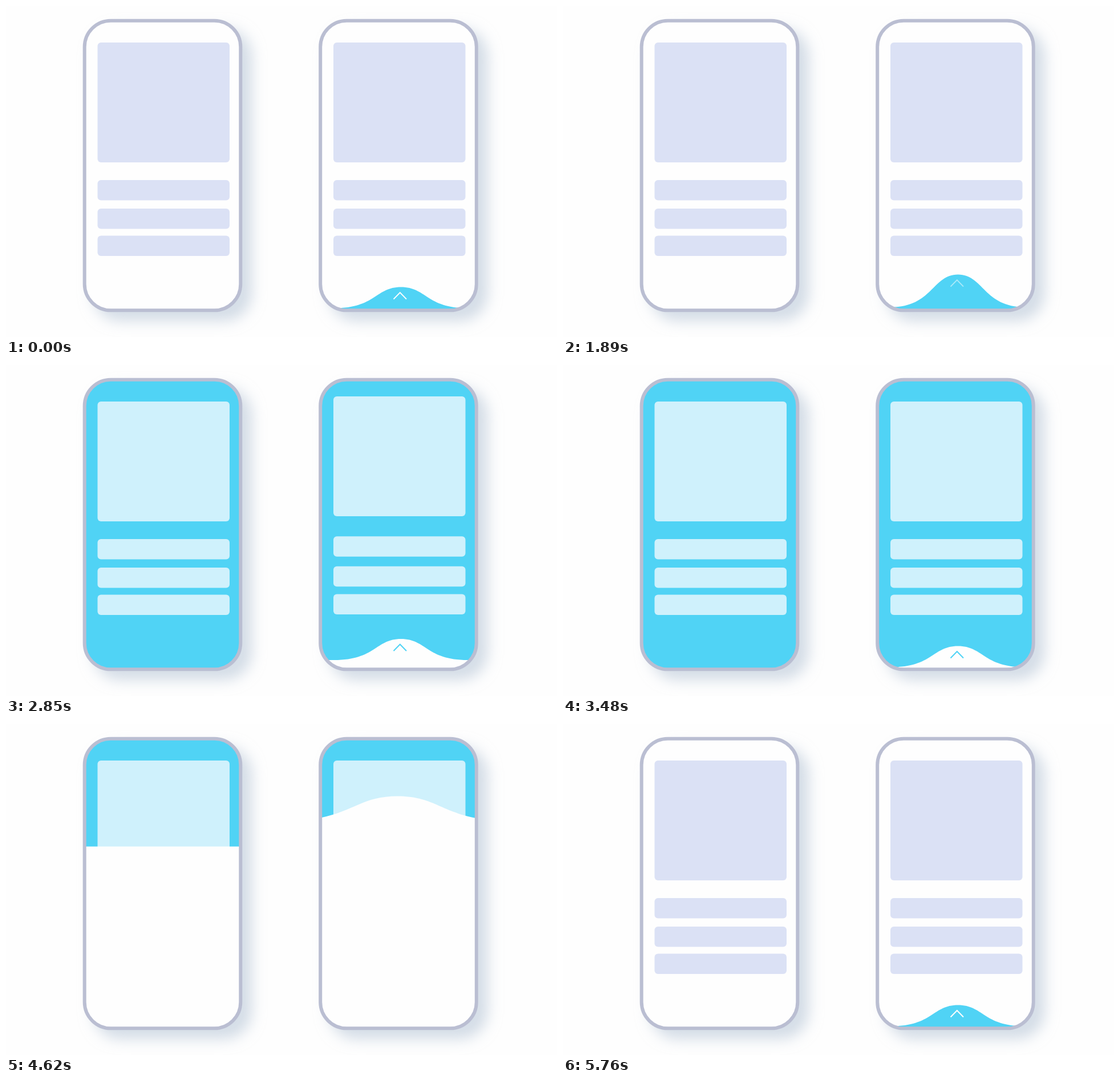
An HTML page with a canvas that plays this animation: 966 by 580 pixels, repeating every 5790 ms.

```html
<!DOCTYPE html>
<html lang="en">
<head>
<meta charset="utf-8">
<title>Swipe up: flat and fluid</title>
<style>
html, body { margin: 0; width: 100%; height: 100%; overflow: hidden; background: #fefefe; }
canvas { display: block; width: 966px; height: 580px; }
</style>
</head>
<body>
<canvas id="stage"></canvas>
<script>
const LOOP = 5790, STEP = 30, FIRST = 1922, SECOND = 4182;
const TOP = 29, BOTTOM = 530, RIGHT_X = 413.5;
const LIGHT = { sheet: '#fefefe', card: '#dbe1f5' };
const BLUE = { sheet: '#50d3f5', card: '#cff1fc' };
const BLOCKS = [[64, 210], [305, 35.5], [355, 35.5], [402.5, 35.5]];

// How the blocks of a page land: later blocks arrive earlier, faster and overshoot more
const FLAT = { lead: 28, over: 1, extra: 0.5, pace: 44.6 };
const FLUID = { lead: 37, over: 17.4, extra: 7.3, pace: 95 };

const canvas = document.getElementById('stage');
const ctx = canvas.getContext('2d');
const ratio = window.devicePixelRatio || 1;
canvas.width = 966 * ratio;
canvas.height = 580 * ratio;

const clamp = v => Math.min(1, Math.max(0, v));

function easeInOut(v) {
  const p = clamp(v);
  return p < 0.5 ? 4 * p ** 3 : 1 - 4 * (1 - p) ** 3;
}

// Damped landing: comes from below, passes 0 at `arrive`, overshoots by `over`, settles
function landing(time, arrive, over, pace) {
  const u = (time - arrive) / pace;
  return Math.min(600, -over * u * Math.exp(1 - u));
}

function blockLag(style, i, time) {
  const arrive = 678 - style.lead * Math.sqrt(i);
  return landing(time, arrive, style.over + style.extra * i, style.pace / (1 + 0.33 * i));
}

// Wave outline at a time relative to its swipe: it swells, then rises and flattens
function waveAt(time, drop) {
  const rise = easeInOut((time + 136) / 1000);
  const swell = 60 * Math.exp(-(((time - 172) / 195) ** 2));
  const base = BOTTOM - 520 * rise + drop;
  return {
    base,
    peak: base - 37 * (1 - rise ** 8) - swell,
    width: 117 + 133 * rise,
    mid: 692.5 - 9 * rise
  };
}

function roundRect(x, y, w, h, r) {
  ctx.beginPath();
  ctx.roundRect(x, y, w, h, r);
}

function cards(x, color, lag = () => 0) {
  ctx.fillStyle = color;
  BLOCKS.forEach(([y, h], i) => {
    roundRect(x + 160.5, y + lag(i), 231.5, h, 6);
    ctx.fill();
  });
}

function page(x, theme) {
  ctx.fillStyle = theme.sheet;
  ctx.fillRect(x + 138, 20, 275, 520);
  cards(x, theme.card);
}

function waveSheet({ base, peak, width, mid }, color) {
  const handle = width * 0.38;
  ctx.fillStyle = color;
  ctx.beginPath();
  ctx.moveTo(400, 600);
  ctx.lineTo(400, base);
  ctx.lineTo(mid - width, base);
  ctx.bezierCurveTo(mid - handle, base, mid - handle, peak, mid, peak);
  ctx.bezierCurveTo(mid + handle, peak, mid + handle, base, mid + width, base);
  ctx.lineTo(966, base);
  ctx.lineTo(966, 600);
  ctx.fill();
}

function arrow(y, color, alpha) {
  ctx.globalAlpha = alpha;
  ctx.strokeStyle = color;
  ctx.lineWidth = 2;
  ctx.beginPath();
  ctx.moveTo(679.5, y + 11.5);
  ctx.lineTo(690.8, y);
  ctx.lineTo(702, y + 11.5);
  ctx.stroke();
  ctx.globalAlpha = 1;
}

function phone(x, drawScreen) {
  ctx.save();
  ctx.shadowColor = 'rgba(178, 195, 213, 0.56)';
  ctx.shadowBlur = 24 * ratio;
  ctx.shadowOffsetX = 17 * ratio;
  ctx.shadowOffsetY = 16 * ratio;
  ctx.fillStyle = '#fefefe';
  roundRect(x + 135, 23, 279, 513, 49);
  ctx.fill();
  ctx.restore();

  ctx.save();
  roundRect(x + 138, 26, 273, 507, 46);
  ctx.clip();
  drawScreen();
  ctx.restore();

  ctx.strokeStyle = '#babed2';
  ctx.lineWidth = 6;
  roundRect(x + 137.7, 25.7, 273.6, 507.6, 46);
  ctx.stroke();
}

function draw(t) {
  const inBlue = t >= FIRST && t < SECOND;
  const [top, under] = inBlue ? [BLUE, LIGHT] : [LIGHT, BLUE];
  const since = inBlue ? t - FIRST : (t - SECOND + LOOP) % LOOP;
  const until = inBlue ? t - SECOND : t < FIRST ? t - FIRST : t - FIRST - LOOP;

  ctx.setTransform(ratio, 0, 0, ratio, 0, 0);
  ctx.fillStyle = '#fefefe';
  ctx.fillRect(0, 0, 966, 580);

  phone(0, () => {
    const rise = easeInOut(since / 800);
    page(0, under);
    ctx.fillStyle = top.sheet;
    ctx.fillRect(138, rise < 1 ? BOTTOM - (BOTTOM - TOP) * rise : 20, 275, 540);
    cards(0, top.card, i => blockLag(FLAT, i, since));
  });

  phone(RIGHT_X, () => {
    page(RIGHT_X, under);
    waveSheet(waveAt(since, 0), top.sheet);
    cards(RIGHT_X, top.card, i => blockLag(FLUID, i, since));
    const next = waveAt(until, landing(since, 800, 13, 128));
    waveSheet(next, under.sheet);
    arrow(next.peak + 9.5, top.sheet, clamp(-until / 64));
  });
}

const start = performance.now();
function tick() {
  const t = (performance.now() - start) % LOOP;
  draw(Math.floor(t / STEP) * STEP);
  requestAnimationFrame(tick);
}
tick();
</script>
</body>
</html>
```
